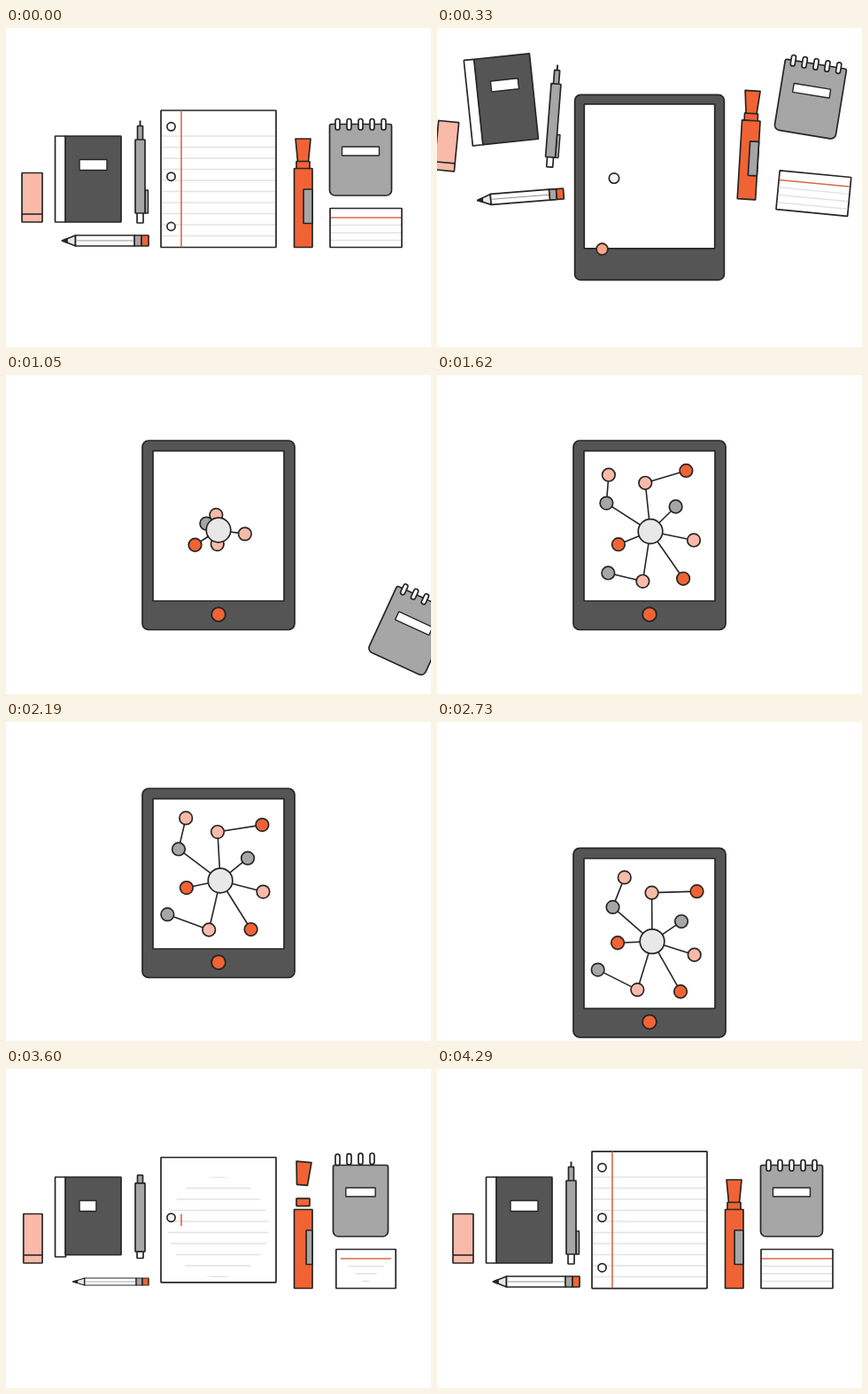
An HTML page with a canvas for the animation above (4320 ms loop, 480 px wide and 360 px high).

```html
<!DOCTYPE html>
<html lang="en">
<head>
<meta charset="utf-8">
<title>Desk to tablet</title>
<style>
  html, body { margin: 0; width: 100%; height: 100%; overflow: hidden; background: #fff; }
  canvas { display: block; width: 480px; height: 360px; }
</style>
</head>
<body>
<canvas id="stage"></canvas>
<script>
const LOOP = 4320;
const INK = '#262626', DARK = '#555', GRAY = '#a6a6a6', ORANGE = '#f16334',
      PINK = '#f9baa9', PALE = '#e8e8e8', RULE = '#e2e2e2', RED = '#d9684a';

const canvas = document.getElementById('stage');
const c = canvas.getContext('2d');
const dpr = window.devicePixelRatio || 1;
canvas.width = 480 * dpr;
canvas.height = 360 * dpr;

// easing
const clamp = v => Math.max(0, Math.min(1, v));
const span = (t, start, length) => clamp((t - start) / length);
const out = u => 1 - (1 - u) ** 3;
const inOut = u => u < 0.5 ? 2 * u * u : 1 - 2 * (1 - u) ** 2;
const mix = (a, b, u) => a + (b - a) * u;
const rad = deg => deg * Math.PI / 180;

// drawing
function paint(fill, width = 1.7) {
  if (fill) { c.fillStyle = fill; c.fill(); }
  if (width) { c.strokeStyle = INK; c.lineWidth = width; c.stroke(); }
}
function box(x, y, w, h, fill, r = 0.5, width) {
  if (w <= 0 || h <= 0) return;
  c.beginPath();
  c.roundRect(x, y, w, h, r);
  paint(fill, width);
}
function shape(points, fill) {
  c.beginPath();
  points.forEach(([x, y]) => c.lineTo(x, y));
  c.closePath();
  paint(fill);
}
function dot(x, y, r, fill) {
  if (r <= 0) return;
  c.beginPath();
  c.arc(x, y, r, 0, 7);
  paint(fill);
}
function line(x1, y1, x2, y2, color = INK, width = 1.6) {
  c.beginPath();
  c.moveTo(x1, y1);
  c.lineTo(x2, y2);
  c.strokeStyle = color;
  c.lineWidth = width;
  c.stroke();
}
function group(draw) {
  c.save();
  draw();
  c.restore();
}
function scaleAt(x, y, sx, sy) {
  c.translate(x, y);
  c.scale(sx, sy);
  c.translate(-x, -y);
}
function turnAt(x, y, deg) {
  c.translate(x, y);
  c.rotate(rad(deg));
  c.translate(-x, -y);
}

// desk items: b is the time on the build-up clock
function eraser(b) {
  const w = 23 * out(span(b, 3300, 520));
  box(41 - w, 163.5, w, 55.5, PINK);
  if (w > 1) line(41 - w, 210, 41, 210);
}

function book(b) {
  const p = out(span(b, 3210, 720));
  box(55.5, 122, 12, mix(0, 97, out(span(b, 3210, 670))), '#fff');
  box(67, 122, 63, 97 * p, DARK);
  box(83, 148.5, 31 * span(b, 3430, 280), 12, '#fff', 0.5, 1.4);
}

function pen(b) {
  const p = out(span(b, 3260, 580));
  if (!p) return;
  const slide = 1 - inOut(span(b, 3540, 320));
  group(() => {
    c.translate(0, 10 * slide);
    if (slide < 0.9) line(151.5, 104.5, 151.5, 111, INK, 2);
    box(148.5, 110.5, 6, 18, GRAY);
  });
  box(148, 200 - 7 * slide, 7, 20, '#fff');
  const clip = span(b, 3650, 250);
  if (clip) box(157, 209 - 26 * clip, 3.5, 26 * clip, GRAY, 0.5, 1.4);
  const h = 83 * p;
  box(146, 167.5 - h / 2, 11, h, GRAY);
}

function pencil(b) {
  const p = out(span(b, 3300, 600));
  if (!p) return;
  group(() => {
    scaleAt(161, 240, p, mix(0.45, 1, span(b, 3400, 500)));
    shape([[63.5, 240], [78.5, 234], [78.5, 246]], PALE);
    shape([[63.5, 240], [69, 237.8], [69, 242.2]], INK);
    box(78.5, 234, 67, 12, '#fff');
    line(80, 240, 144, 240, '#777', 0.8);
    box(145, 234, 8, 12, GRAY);
    box(153, 234, 8, 12, ORANGE);
  });
}

function marker(b) {
  const p = out(span(b, 3280, 320));
  if (!p) return;
  const neck = span(b, 3480, 240), cap = span(b, 3520, 230);
  if (cap) group(() => {
    c.translate(0, -23 * (1 - cap * cap));
    turnAt(335.5, 138, 7 * (1 - cap));
    shape([[327, 125], [344, 125], [341.5, 151], [329.5, 151]], ORANGE);
  });
  if (neck) box(328, 150.5 - 6 * (1 - neck * neck), 15, 8.5, ORANGE);
  box(325.5, 247.5 - 89 * p, 20.5, 89 * p, ORANGE);
  const w = 10 * span(b, 3400, 290);
  box(346 - w, 182, w, 38.5, GRAY);
}

function notepad(b) {
  const p = out(span(b, 3330, 525));
  if (!p) return;
  const w = 70 * p;
  box(400.5 - w / 2, 108.5, w, 80.5, GRAY, [2, 2, 6, 6]);
  const label = 42 * out(span(b, 3400, 490));
  box(400.5 - label / 2, 134, label, 10, '#fff', 0.5, 1.4);
  for (let i = 0; i < 5; i++) {
    const u = span(b, 3440 + 50 * i, 400);
    if (u) box(372 + 13 * i, 102.5 - 7.5 * (1 - u * u), 5, 12.5, '#fff', 2.5);
  }
}

function card(b) {
  const p = out(span(b, 3350, 560));
  if (!p) return;
  const w = 81 * p, reach = 75 * span(b, 3460, 370);
  box(406.5 - w / 2, 203.5, w, 44, '#fff');
  for (let i = 0; i < 4; i++) {
    const half = Math.min(w / 2 - 1, reach - 8.2 * i);
    if (half > 0) line(406.5 - half, 214 + 8.5 * i, 406.5 + half, 214 + 8.5 * i, i ? RULE : RED, 1.5);
  }
}

// each: drawing, pivot, shift and turn at 690 ms, depth already fallen by then
const items = [
  [eraser, 29.5, 191, -38, -34, 11, 25],
  [book, 92.5, 170.5, -41, -66, -12, 25],
  [pen, 151.5, 163, -40, -39, 9, 25],
  [pencil, 112, 240, -36, -25, -9, 25],
  [marker, 335.5, 186, 35, -30, 7, 25],
  [notepad, 400.5, 148.5, 42.5, -54, 18.7, 15.4],
  [card, 406.5, 225.5, 38, -14.5, 11, 25]
];

function desk(t) {
  if (t >= 1080 && t < 3200) return;
  const building = t >= 3200;
  const drift = Math.sin(Math.PI / 2 * span(t, 30, 1310)) / 0.711;
  const rise = out(span(t, 30, 400));
  const fall = (Math.max(0, t - 430) / 260) ** 3;
  for (const [draw, x, y, dx, dy, turn, depth] of items) group(() => {
    if (!building) {
      c.translate(dx * drift, (dy - depth) * rise + depth * fall);
      turnAt(x, y, turn * drift);
    }
    draw(building ? t : LOOP);
  });
}

function rules(x, y, w, h, radius) {
  if (radius <= 0) return;
  group(() => {
    c.beginPath();
    c.rect(x + 1, y + 1, w - 2, h - 2);
    c.clip();
    c.beginPath();
    c.arc(240, 178.5, radius, 0, 7);
    c.clip();
    for (let i = 0; i < 10; i++) line(x, 122 + 12.5 * i, x + w, 122 + 12.5 * i, RULE, 1.4);
  });
}

function paper(t) {
  const p = out(span(t, 3250, 630));
  if (!p) return;
  const h = 154.5 * p;
  box(175, 170.3 - h / 2, 130, h, '#fff');
  rules(175, 170.3 - h / 2, 130, h, 100 * span(t, 3430, 300));
  const red = 77 * out(span(t, 3590, 360));
  if (red) line(198, 170.3 - red, 198, 170.3 + red, RED);
  const spread = 56.5 * out(span(t, 3610, 330));
  if (spread) [-1, 1].forEach(s => dot(186.5, 167.7 + s * spread, 4.6, '#fff'));
  dot(186.5, 167.7, 4.6 * span(t, 3420, 140), '#f4f4f4');
}

// network: parent, angle at 2190 ms, degrees per ms, length, colour, start
const nodes = [
  [-1, 168, 0.0178, 39, ORANGE, 800],
  [-1, 14.6, 0.0055, 50, PINK, 892],
  [-1, 266.8, 0.005, 55, PINK, 980],
  [-1, 103, 0.0075, 57, PINK, 988],
  [-1, 217, 0.0075, 59, GRAY, 993],
  [-1, -39.3, 0.009, 40, GRAY, 1050],
  [-1, 57.9, 0.0048, 65, ORANGE, 1080],
  [2, -9, 0.0135, 51, ORANGE, 1250],
  [4, -76.8, 0.0154, 36, PINK, 1310],
  [3, 200.3, 0.012, 50, GRAY, 1370]
];

function network(t) {
  const arrive = inOut(span(t, 150, 510));
  const age = Math.max(0, t - 1050);
  const hub = [mix(186.5, 240, arrive) + 0.0018 * age, mix(167.7, 175, arrive) + 0.0026 * age];
  const spots = [];
  nodes.forEach(([parent, angle, rate, length, , start], i) => {
    const [px, py] = parent < 0 ? hub : spots[parent];
    const a = rad(angle + rate * (t - 2190)), d = length * out(span(t, start, 600));
    spots[i] = [px + d * Math.cos(a), py + d * Math.sin(a)];
    if (t > start) line(px, py, ...spots[i]);
  });
  for (let i = nodes.length - 1; i >= 0; i--) {
    const [, , , , color, start] = nodes[i];
    if (t > start) dot(...spots[i], 7.3, color);
  }
  const r = mix(4.6, 9, arrive) + 4.8 * out(span(t, 680, 330));
  dot(...hub, r, arrive < 0.3 ? '#f4f4f4' : PALE);
}

function tablet(t) {
  const grow = out(span(t, 90, 420)), open = out(span(t, 60, 400));
  group(() => {
    if (t > 2015) c.translate(0, 68 * ((t - 2015) / 715) ** 3);
    if (grow) box(mix(175, 154, grow), mix(93, 74, grow), mix(130, 172, grow),
      mix(154.5, 213.5, grow), DARK, 7 * grow);
    const x = mix(175, 166, open), y = mix(93, 85.7, open), w = mix(130, 148, open);
    const h = mix(154.5, 163.3, open) + 6 * inOut(span(t, 690, 330));
    box(x, y, w, h, '#fff');
    rules(x, y, w, h, 100 * (1 - span(t, 15, 300)));
    const red = 77 * (1 - inOut(span(t, 15, 330)));
    if (red) line(198, 170.3 - red, 198, 170.3 + red, RED);
    dot(186.5, 111.3, 4.6 * (1 - span(t, 15, 220)), '#fff');

    const drop = inOut(span(t, 120, 400));
    const bx = mix(186.5, 240, inOut(span(t, 590, 390)));
    const by = mix(224, 270.2, drop), br = mix(4.6, 7.8, drop);
    dot(bx, by, br, '#fff');
    c.globalAlpha = drop;
    dot(bx, by, br, ORANGE);
    c.globalAlpha = 1;
    network(t);
  });
}

function render(t) {
  c.setTransform(dpr, 0, 0, dpr, 0, 0);
  c.fillStyle = '#fff';
  c.fillRect(0, 0, 480, 360);
  c.lineJoin = 'round';
  if (t < 3200) tablet(t); else paper(t);
  desk(t);
}

const begin = performance.now();
function tick() {
  render((performance.now() - begin) % LOOP);
  requestAnimationFrame(tick);
}
tick();
</script>
</body>
</html>
```
